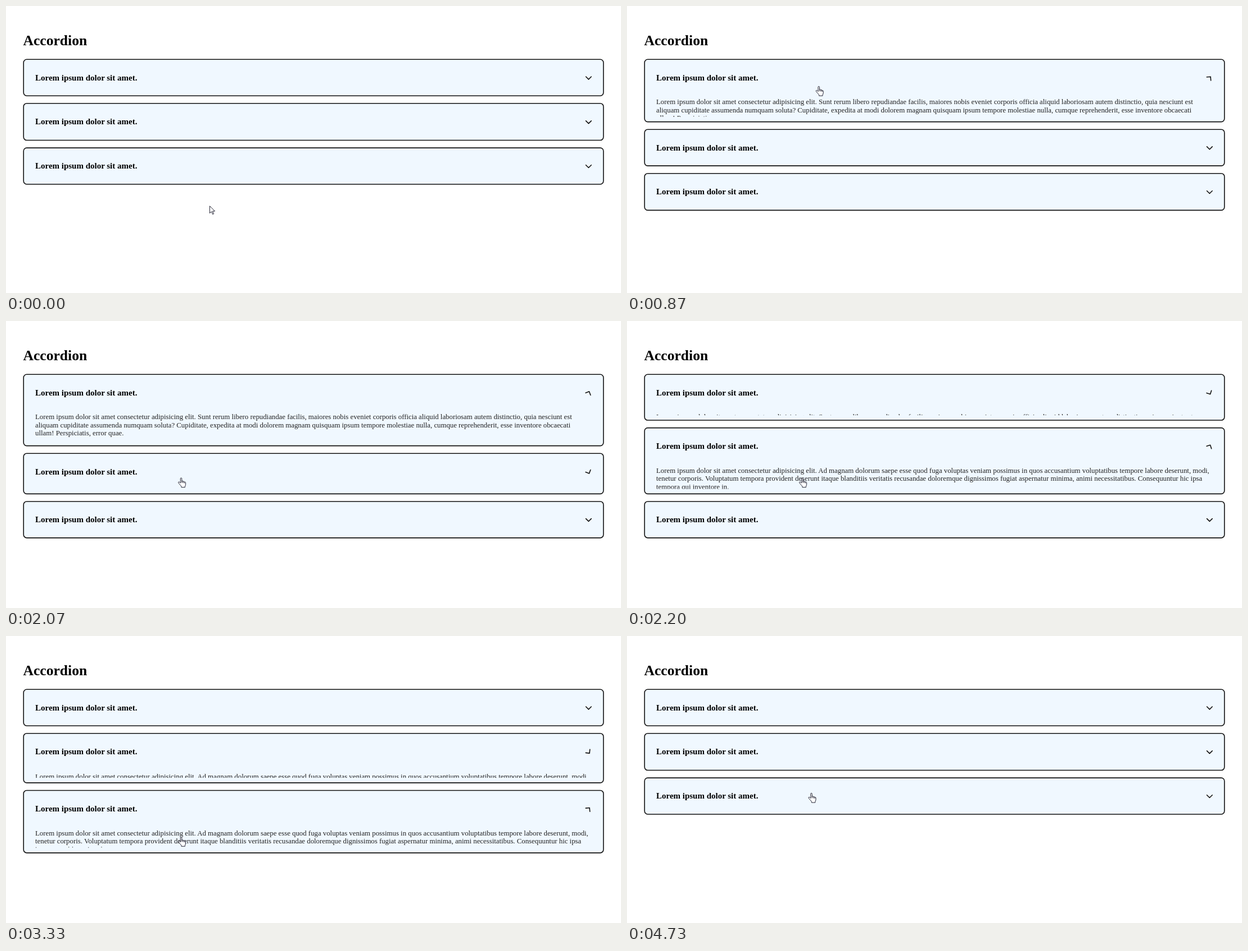
An HTML page for the animation above (6.27 s loop, 1094 by 512 pixels).

```html
<!DOCTYPE html>
<html lang="en">
<head>
<meta charset="utf-8">
<title>Accordion</title>
<style>
  html, body { margin: 0; width: 100%; height: 100%; overflow: hidden; background: #fff; }
  svg { display: block; }
  text { font-family: "Liberation Serif", serif; }
  .title { font-size: 32px; font-weight: bold; }
  .heading { font-size: 18.72px; font-weight: bold; }
  .body { font-size: 16px; fill: #222; }
  .box { fill: #f0f8ff; stroke: #111; stroke-width: 2; }
  .chevron { fill: none; stroke: #111; stroke-width: 2; stroke-linecap: round; stroke-linejoin: round; }
  .cursor path { fill: #fff; stroke: #1a1a2a; stroke-width: 1.2; stroke-linejoin: round; }
  .cursor .creases { fill: none; }
</style>
</head>
<body>
<svg width="1094" height="512">
  <!-- A page 1366 px wide, shown reduced -->
  <g transform="scale(.80088)">
    <text class="title" x="38" y="88">Accordion</text>
    <g id="items"></g>
    <g id="cursor" class="cursor">
      <path id="arrow" d="M.5 .5V16.5L4.5 13 7 19 9.4 18 6.9 12H12z"/>
      <g id="hand" transform="translate(-7 .5)">
        <path d="M5.5 12V2a1.5 1.5 0 0 1 3 0V8.5c0-2 3-2 3 .3v.8c0-2 3-1.8 3 .3v.9c0-1.7 2.5-1.6 2.5.4V15c0 2-1 3-1.5 4.5v2h-8v-2C6 17 3 14.5 1 11.5c-1-1.7 1-3 2.3-1.7z"/>
        <path class="creases" d="M8.5 8v3.5M11.5 9v3M14.5 10v2.5"/>
      </g>
    </g>
  </g>
</svg>
<script>
const LOOP = 6270, STEP = 200 / 3, DURATION = 200;
const TOP = 117.88, CLOSED = 83.44, CONTENT = 86, GAP = 15, INSET = 12;
const HEADING = 'Lorem ipsum dolor sit amet.';
const FIRST = [
  'Lorem ipsum dolor sit amet consectetur adipisicing elit. Sunt rerum libero repudiandae facilis, maiores nobis eveniet corporis officia aliquid laboriosam autem distinctio, quia nesciunt est',
  'aliquam cupiditate assumenda numquam soluta? Cupiditate, expedita at modi dolorem magnam quisquam ipsum tempore molestiae nulla, cumque reprehenderit, esse inventore obcaecati',
  'ullam! Perspiciatis, error quae.'
];
const OTHER = [
  'Lorem ipsum dolor sit amet consectetur adipisicing elit. Ad magnam dolorum saepe esse quod fuga voluptas veniam possimus in quos accusantium voluptatibus tempore labore deserunt, modi,',
  'tenetur corporis. Voluptatum tempora provident deserunt itaque blanditiis veritatis recusandae doloremque dignissimos fugiat aspernatur minima, animi necessitatibus. Consequuntur hic ipsa',
  'tempora qui inventore in.'
];

// Cursor moves: start step, end step, destination, sideways bow
const MOVES = [
  [0, 7, 426, 176.5, -14],
  [11, 12, 426, 178, 0],
  [19, 26, 389, 348.5, 0],
  [39, 45, 389, 446.5, 0],
  [58, 64, 409.5, 349, 0]
];

const byId = id => document.getElementById(id);
const clamp = v => Math.min(1, Math.max(0, v));
const smooth = p => p * p * (3 - 2 * p);
const swing = p => p + .5 * p * (1 - p);

function add(parent, tag, attrs, text = '') {
  const node = document.createElementNS('http://www.w3.org/2000/svg', tag);
  setAll(node, attrs);
  node.textContent = text;
  return parent.appendChild(node);
}

function setAll(node, attrs) {
  for (const key in attrs) node.setAttribute(key, attrs[key]);
}

function createItem(lines, opens, closes) {
  const root = byId('items');
  const item = {
    opens, closes,
    box: add(root, 'rect', { class: 'box', x: 39, width: 1288, rx: 7 }),
    heading: add(root, 'text', { class: 'heading', x: 65 }, HEADING),
    chevron: add(root, 'path', { class: 'chevron', d: 'M-6-2.7L0 3.3 6-2.7' }),
    content: add(root, 'svg', { width: 1328, overflow: 'hidden' })
  };
  item.lines = lines.map(line => add(item.content, 'text', { class: 'body', x: 65 }, line));
  return item;
}

const items = [
  createItem(FIRST, 733, 2048),
  createItem(OTHER, 2048, 3199),
  createItem(OTHER, 3199, 4520)
];

function drawItem(item, top, time) {
  const opening = clamp((time - item.opens) / DURATION);
  const closing = clamp((time - item.closes) / DURATION);
  const bottom = top + CLOSED + CONTENT * (opening - closing);
  const y = Math.round(top), end = Math.round(bottom);
  const angle = -180 * (swing(opening) - swing(closing));

  setAll(item.box, { y: y + 1, height: end - y - 2 });
  setAll(item.heading, { y: Math.round(top + 47.72) });
  setAll(item.chevron, { transform: `translate(1294 ${top + 42.2}) rotate(${angle})` });
  setAll(item.content, { height: end - INSET });
  item.lines.forEach((line, i) => setAll(line, { y: Math.round(top + 101.44) + 18 * i }));
  return bottom;
}

function cursorAt(step) {
  let x = 452, y = 445;
  for (const [from, to, toX, toY, bow] of MOVES) {
    const p = smooth(clamp((step - from) / (to - from)));
    x += (toX - x) * p + bow * Math.sin(Math.PI * p);
    y += (toY - y) * p;
  }
  return { x, y };
}

function draw(now) {
  // The picture advances fifteen times a second
  const step = Math.floor((now % LOOP + 3.4) / STEP);
  const cursor = cursorAt(step);
  let top = TOP, hovering = false;
  for (const item of items) {
    const bottom = drawItem(item, top, step * STEP);
    hovering ||= cursor.y >= top && cursor.y <= bottom;
    top = bottom + GAP;
  }
  setAll(byId('cursor'), { transform: `translate(${cursor.x} ${cursor.y})` });
  byId('arrow').style.display = hovering ? 'none' : '';
  byId('hand').style.display = hovering ? '' : 'none';
}

const start = performance.now();
function tick() {
  draw(performance.now() - start);
  requestAnimationFrame(tick);
}
tick();
</script>
</body>
</html>
```
